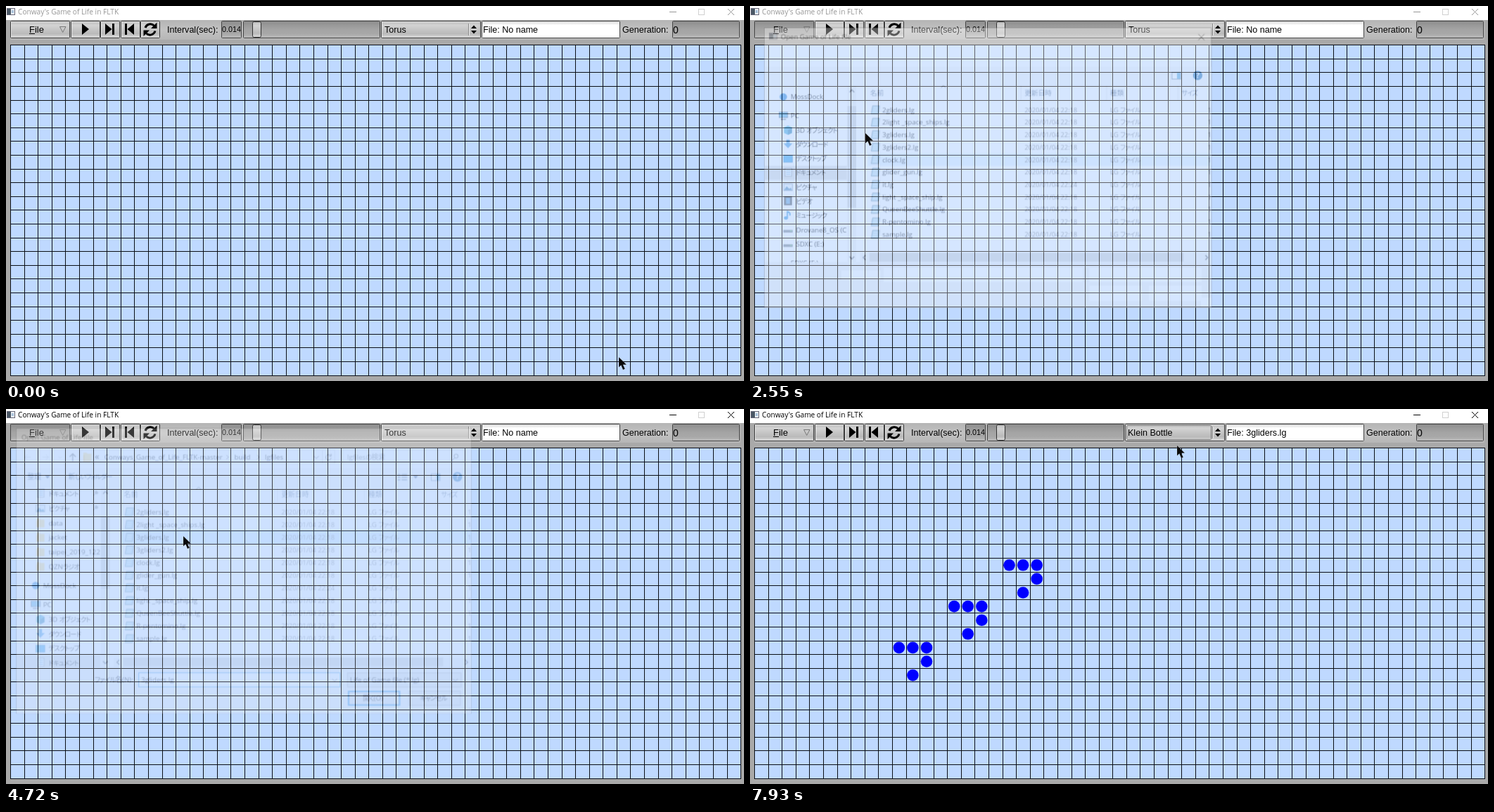
An HTML page that plays this animation: 1049 by 534 pixels, repeating every 8 s.

```html
<!DOCTYPE html>
<html lang="ja">
<head>
<meta charset="utf-8">
<title>Game of Life</title>
<style>
html,body{margin:0;width:100%;height:100%;overflow:hidden;background:#a9a9a9}
svg{display:block;width:1049px;height:534px}
text{white-space:pre}
.ui{font:10.15px 'Open Sans','Noto Sans CJK JP','Noto Sans CJK',sans-serif;font-feature-settings:"palt"}
.kana{font-size:9.6px;letter-spacing:-.8px}
.app{font:12.55px 'Liberation Sans',Arial,sans-serif}
.dim{fill:#6d6d6d}
.date{font-size:9.7px}
.line{fill:none;stroke:#444}
#dialog{transform-origin:338px 230px;animation:dialog 8s step-end infinite}
#nav{animation:nav 8s step-end infinite}
#cursor{animation:cursor 8s step-end infinite}
@keyframes dialog{
  0%{opacity:0;transform:scale(.93)}
  31.7%{opacity:.35;transform:scale(.95)}
  32.7%{opacity:.8;transform:scale(.985)}
  33.7%,56%{opacity:1;transform:none}
  57%{opacity:.8;transform:scale(.99)}
  58%{opacity:.5;transform:scale(.98)}
  59%{opacity:.22;transform:scale(.967)}
  59.9%,100%{opacity:0;transform:scale(.95)}
}
@keyframes nav{
  0%{transform:translateY(-128px)}
  36.6%,100%{transform:none}
}
@keyframes cursor{
  0%{transform:translate(871px,500px)}
  .87%{transform:translate(871px,500px);animation-timing-function:steps(9,start)}
  9.6%{transform:translate(84px,41px)}
  10.5%{transform:translate(84px,41px);animation-timing-function:steps(3,start)}
  13.3%{transform:translate(71px,35px)}
  16.37%{transform:translate(71px,35px);animation-timing-function:steps(3,start)}
  19.2%{transform:translate(63px,49px)}
  20.12%{transform:translate(60px,55px)}
  21.12%{transform:translate(56px,49px)}
  24%{transform:translate(45px,44px)}
  26%{transform:translate(45px,44px);animation-timing-function:steps(5,start)}
  30.72%{transform:translate(126px,155px);animation-timing-function:steps(5,start)}
  35.62%{transform:translate(221px,220px)}
  36.6%{transform:translate(221px,220px);animation-timing-function:steps(11,start)}
  47.2%{transform:translate(256px,203px);animation-timing-function:steps(3,start)}
  50.1%{transform:translate(252px,184px)}
  56%{transform:translate(252px,181px)}
  59.87%{transform:translate(252px,181px);animation-timing-function:steps(7,start)}
  66.37%{transform:translate(201px,65px);animation-timing-function:steps(2,start)}
  68.3%{transform:translate(216px,45px);animation-timing-function:steps(4,start)}
  72.1%{transform:translate(385px,39px);animation-timing-function:steps(5,start)}
  77%{transform:translate(573px,50px);animation-timing-function:steps(6,start)}
  82.7%{transform:translate(623px,35px)}
  85.75%{transform:translate(623px,35px);animation-timing-function:steps(5,start)}
  90.6%{transform:translate(600px,41px)}
  93.37%{transform:translate(610px,45px)}
  96.25%{transform:translate(610px,52px)}
  99.12%,100%{transform:translate(607px,52px)}
}
</style>
</head>
<body>
<svg id="stage" viewBox="0 0 1049 534"></svg>
<script>
const LOOP = 8000, MENU = 1140, MENU_END = 2080, READY = 2850, LOADED = 4870, PICK = 6690, PICKED = 7700;
const range = n => [...Array(n).keys()];

const rect = (x, y, w, h, fill, more = '') =>
  `<rect x="${x}" y="${y}" width="${w}" height="${h}" fill="${fill}" ${more}/>`;
const box = (x, y, w, h, fill, stroke, more = '') =>
  rect(x + .5, y + .5, w - 1, h - 1, fill, `stroke="${stroke}" ${more}`);
const text = (x, y, s, more = '') => `<text x="${x}" y="${y}" ${more}>${
  s.replace(/[\u3040-\u30ff]+/g, '<tspan class="kana">$&</tspan>')}</text>`;
const path = (d, more = 'class="line"') => `<path d="${d}" ${more}/>`;
const during = (times, s) => `<g data-on="${times}">${s}</g>`;
const gradient = (id, ...colors) =>
  `<linearGradient id="${id}" x2="0" y2="1">${colors.map((c, i) =>
    `<stop offset="${i / (colors.length - 1)}" stop-color="${c}"/>`).join('')}</linearGradient>`;

const button = (x, w, fill = 'url(#up)') =>
  box(x, 21, w, 25, fill, '#3a3a3a', 'rx="1"') + path(`M${x + 1.5} 44V22.5H${x + w - 2}`, 'fill="none" stroke="#fff" opacity=".55"');
const sunken = (x, w, fill = 'url(#down)') => box(x, 21, w, 25, fill, '#444', 'rx="1"');

function titleBar() {
  return rect(0, 0, 1049, 20, '#fff') + appIcon(1, 3) + `<g id="title" fill="currentColor" class="ui">${
    text(17, 12, "Conway's Game of Life in FLTK")}${
    path('M943 8.5h10M1026 4l9 9m0-9l-9 9', 'stroke="currentColor" fill="none"')}</g>` +
    box(984, 4, 9, 9, 'none', '#d0d0d0');
}

function appIcon(x, y) {
  return box(x, y, 12, 10, '#eef2f6', '#667') + rect(x + 1, y + 1, 5, 8, '#4a5866') + rect(x + 7, y + 3, 3, 4, '#a9c3dc');
}

function toolbar() {
  return rect(6, 20, 1038, 28, 'url(#bar)') +
    button(6, 85) + during(`${MENU} ${LOADED}`, sunken(6, 85)) +
    text(33, 38, 'File', 'font-size="13"') + rect(33, 39, 8, 1, '#000') +
    path('M76.5 29.5h8.5L80.7 37.5z', 'fill="none" stroke="#777"') +
    button(92, 42) + path('M108 25v16l10-8z', '') +
    button(134, 28) + path('M141 25v16l9.5-8zM151 25h3v16h-3z', '') +
    button(163, 28) + path('M182 25v16l-9.5-8zM169 25h3v16h-3z', '') +
    button(191, 28) +
    path('M198 31A7.5 7.5 0 0 1 210.500 28M212 35.500A7.500 7.500 0 0 1 199.500 39', 'fill="none" stroke="#000" stroke-width="3"') +
    path('M214.500 23.500v8.500h-8.500zM195.500 43v-8.500h8.500z', '') +
    text(229, 38, 'Interval(sec):') + sunken(306, 29) + text(307, 37, '0.014', 'font-size="10.8"') +
    sunken(337, 195) + box(350, 22, 13, 23, 'url(#up)', '#333', 'rx="2"') +
    button(533, 142) + rect(657, 25, 1, 17, '#888') + rect(658, 25, 1, 17, '#eee') +
    path('M661 32l4-4.500 4 4.500zM661 35l4 4.500 4-4.500z', '') +
    during(`0 ${PICKED}`, text(538, 38, 'Torus')) +
    during(`${PICKED} ${LOOP}`, text(537, 38, 'Klein Bottle') + box(535, 23, 121, 21, 'none', '#777', 'rx="1"')) +
    sunken(676, 197, 'url(#field)') +
    during(`0 ${LOADED}`, text(678, 38, 'File: No name')) +
    during(`${LOADED} ${LOOP}`, text(678, 38, 'File: 3gliders.lg')) +
    text(876, 38, 'Generation:') + sunken(947, 96) + text(948, 38.500, '0', 'font-size="14"');
}

const CW = 19.585, CH = 19.6;

function board() {
  const cols = range(54).map(i => rect(Math.round(6.1 + i * CW), 55, 1, 472, '#0b0f16')).join('');
  const rows = range(25).map(i => rect(6, Math.round(55.2 + i * CH), 1039, 1, '#0b0f16')).join('');
  const glider = (c, r) => [[0, 0], [1, 0], [2, 0], [2, 1], [1, 2]].map(([x, y]) =>
    `<circle cx="${6.2 + (c + x + .5) * CW}" cy="${55.7 + (r + y + .5) * CH}" r="8.300" fill="#00f"/>`).join('');
  return rect(6, 55, 1038, 471, '#bfd9ff') + cols + rows +
    during(`${LOADED} ${LOOP}`, glider(18, 8) + glider(14, 11) + glider(10, 14));
}

// Each item may carry the time span in which it is lit.
function menu(x, y, w, items) {
  return box(x, y, w, items.length * 18 + 2, '#c8c8c8', '#444') + items.map(([name, lit], i) => {
    const top = y + 1 + i * 18;
    return text(x + 5, top + 13.500, name) + (lit ? during(lit,
      rect(x + 2, top, w - 4, 18, '#0078d7') + text(x + 5, top + 13.500, name, 'fill="#fff"')) : '');
  }).join('');
}

const icons = {
  folder: x => path(`M${x - 6}-6.500h5l1 1.500h6v11.500h-12z`, 'fill="#ffd977"') + rect(x - 6, -3, 2, 9, '#f3bf4c'),
  doc: x => box(x - 5, -7, 11, 13, '#fff', '#8a97a3') + path(`M${x - 3}-3.500h7m-7 3h7m-7 3h7`, 'stroke="#5b9bd0"'),
  picture: x => box(x - 7, -5, 14, 11, '#e9f3fa', '#8797a5') + path(`M${x - 6} 5l4-6 4 4 2-2 2 4z`, 'fill="#3f7fae"'),
  dot: x => `<circle cx="${x}" r="5.500" fill="#0a74d0"/>`,
  pc: x => box(x - 7, -6, 14, 9, '#4aa9e0', '#567') + rect(x - 4, 4.500, 8, 1.500, '#567'),
  cube: x => path(`M${x}-7l6 3v8l-6 3-6-3v-8z`, 'fill="#35a5d8"') + path(`M${x} 0l6-4v8l-6 3z`, 'fill="#1673a5"'),
  down: x => path(`M${x - 2.5}-7h5v6h4l-6.500 7-6.500-7h4z`, 'fill="#2c8fe0"'),
  desk: x => box(x - 7, -5, 14, 11, '#1b97ea', '#1676bd'),
  video: x => rect(x - 6, -7, 12, 13, '#35393d') + rect(x - 3, -5, 6, 9, '#5a9bd2'),
  music: x => path(`M${x - 1}-7v10M${x - .5}-6q5 2 3 6`, 'fill="none" stroke="#1b87d6" stroke-width="2"') +
    `<ellipse cx="${x - 3}" cy="3.500" rx="3" ry="2.500" fill="#1b87d6"/>`,
  drive: x => rect(x - 7, 0, 14, 4, '#6d7479') + rect(x + 3, 1, 3, 1, '#6ee07a')
};

const places = [
  [1, 116.5, 'doc', 'ドキュメント', 1], [1, 138, 'picture', 'ピクチャ', 1], [1, 160, 'folder', 'data'],
  [1, 181, 'folder', 'jacket'], [1, 202.5, 'folder', 'taipei_2019_1226'], [1, 224, 'folder', 'QZNラジオ'],
  [0, 252, 'dot', 'MossDock'], [0, 280.5, 'pc', 'PC'], [1, 302, 'cube', '3D オブジェクト'],
  [1, 323, 'down', 'ダウンロード'], [1, 344.5, 'desk', 'デスクトップ'], [1, 365.5, 'doc', 'ドキュメント'],
  [1, 387, 'picture', 'ピクチャ'], [1, 408.5, 'video', 'ビデオ'], [1, 430, 'music', 'ミュージック'],
  [1, 451.5, 'drive', 'Drovane8_OS (C:)'], [1, 473, 'drive', 'SDXC (E:)'], [0, 501, 'drive', 'SDXC (F:)']
];

const files = ['2gliders.lg', '2light _space_ships.lg', '3gliders.lg', '3gliders2.lg', 'clock.lg', 'glider_gun.lg',
  'it.lg', 'light _space_ship.lg', 'QueenBeeShuttle.lg', 'R-pentomino.lg', 'sample.lg'];
const ROW = 18.67;

function navPane() {
  const list = places.map(([deep, y, icon, name, pin]) =>
    `<g transform="translate(0 ${y})">${icons[icon](deep ? 39 : 32)}${text(deep ? 51 : 43, 3.7, name)}${
      pin ? path('M117 3l3-3m-1-3l4 4m-2-5l3 3-3 2-2-2z', 'fill="#888" stroke="#888"') : ''}</g>`).join('');
  const bar = (y, h) => rect(128, y, 13, h, '#cdcdcd');
  return `<g clip-path="url(#pane)"><g id="nav">${rect(4, 355.5, 123, 21, '#d9d9d9')}${list}</g></g>` +
    rect(128, 107, 13, 265, '#f0f0f0') + during('0 2930', bar(138, 152)) + during(`2930 ${LOOP}`, bar(151, 106)) +
    path('M131 117l3.500-3.500 3.500 3.500M131 363.500l3.500 3.500 3.500-3.500', 'fill="none" stroke="#444" stroke-width="1.500"');
}

function fileList() {
  const heads = [[162, '名前'], [393, '更新日時'], [521, '種類'], [628, 'サイズ']];
  return heads.map(([x, s]) => text(x, 121.500, s, 'fill="#4c607a"')).join('') +
    [387, 515, 622].map(x => rect(x, 107, 1, 22, '#e2e2e2')).join('') + path('M268 110.500l3.500-3.500 3.500 3.500') +
    `<g id="hover">${rect(159, 134, 513, ROW, '#e5f3ff')}${
      during(`4310 ${LOOP}`, rect(159.5, 134.5, 512, ROW - 1, '#cce8ff', 'stroke="#99d1ff"'))}</g>` +
    files.map((name, i) => {
      const y = 143.5 + i * ROW;
      return path(`M165.500 ${y - 6}h10.500l-1.500 12h-11z`, 'fill="#a9d3e6" stroke="#6d8d9d"') +
        path(`M167 ${y - 3}h6m-6.500 3h6m-6.500 3h6`, 'stroke="#e9f7fc"') +
        text(180, y + 3.7, name, 'fill="#111"') +
        text(393, y + 3.7, `2020/01/04 22:${i == 6 ? 24 : 18}`, 'class="dim date"') +
        text(521, y + 3.7, 'LG ファイル', 'class="dim"') + text(667, y + 3.7, '1', 'class="dim"');
    }).join('') +
    rect(147, 358, 525, 14, '#f0f0f0') + rect(161, 358, 470, 13, '#cdcdcd') +
    path('M155 361.500l-3.500 3.500 3.500 3.500M663.500 361.500l3.500 3.500-3.500 3.500', 'fill="none" stroke="#444" stroke-width="1.500"');
}

function addressBar() {
  return path('M25 63H16m4-4l-4 4 4 4M42 63h9m-4-4l4 4-4 4M65.500 62l2.500 2.500 2.500-2.500', 'fill="none" stroke="#ccc"') +
    path('M86.500 69V58m-4.500 4.500l4.500-4.500 4.500 4.500', 'fill="none" stroke="#555" stroke-width="1.500"') +
    box(98, 52, 374, 21, '#fff', '#d9d9d9') + `<g transform="translate(0 63)">${icons.folder(108)}</g>` +
    text(119, 66, '«', 'font-size="13"') + text(133, 66.500, 'Conways_Game_of_Life_FLTK-master') +
    path('M312.500 60l3 3-3 3M357.500 60l3 3-3 3M441 61.500l3.500 3.500 3.500-3.500') +
    text(324, 66.500, 'build') + text(369, 66.500, 'lgfiles') + rect(453, 53, 1, 19, '#d9d9d9') +
    path('M465.500 60.500A4 4 0 1 0 466.500 64M466.500 58v3.500h-3.500') +
    box(482, 52, 180, 21, '#fff', '#d9d9d9') + text(490, 66.500, 'lgfilesの検索', 'class="dim"') +
    `<circle cx="650" cy="61.500" r="3" class="line"/>` + path('M648 64l-4 4');
}

function bottomBlank() {
  return [[119, 384, 59, 14], [182, 380, 298, 22], [490, 380, 168, 22], [490, 407, 79, 23], [579, 407, 79, 23], [657, 425, 15, 14]]
    .map(r => rect(...r, '#fff')).join('');
}

function bottomFull() {
  return text(119, 394.500, 'ファイル名(N):') + box(183, 380, 297, 22, '#fff', '#0078d7') +
    during(`${READY} 3380 3910 4310`, rect(186, 384, 1.5, 15, '#000')) +
    during(`4310 ${LOOP}`, text(187, 394.500, '3gliders.lg')) +
    path('M468 389.500l3.500 3.500 3.500-3.500') +
    box(490, 380, 168, 22, '#e1e1e1', '#adadad') + text(494, 394.500, 'Life of Game file (*.lg)') +
    path('M645.500 389.500l3.500 3.500 3.500-3.500') +
    rect(492, 408, 75, 20, '#e1e1e1', 'stroke="#0078d7" stroke-width="2"') + text(513, 421.500, '開く(O)') +
    box(580, 407, 77, 22, '#e1e1e1', '#adadad') + text(597, 421.500, 'キャンセル') +
    [[669, 432], [669, 436], [665, 436]].map(([x, y]) => rect(x, y, 2, 2, '#bbb')).join('');
}

function dialog() {
  return `<g id="dialog" class="ui">` + box(3, 20, 670, 421, '#fff', '#777') +
    during('0 4560', appIcon(11, 28) + text(28, 37.500, 'Open Game of Life file') +
      path('M653 30l9 9m0-9l-9 9', 'stroke="#111"')) +
    during(`4560 ${LOOP}`, text(11, 37.500, 'Open Game of Life file')) +
    rect(4, 79, 668, 27, '#f5f6f7') + rect(4, 106, 668, 1, '#e8e9ea') +
    box(613, 87, 14, 11, '#fff', '#667d90') + rect(621, 88, 5, 9, '#4aa3d8') +
    `<circle cx="652" cy="92" r="7" fill="#0b5fa5"/>` + text(649.500, 96, '?', 'fill="#fff" font-weight="700" font-size="11"') +
    navPane() + fileList() + rect(4, 372, 668, 68, '#f0f0f0') +
    during(`0 ${READY}`, bottomBlank()) + during(`${READY} ${LOOP}`, addressBar() + bottomFull()) +
    during(`2930 ${LOOP}`, text(20, 95.500, '整理', 'fill="#1e395b"') + text(80, 95.500, '新しいフォルダー', 'fill="#1e395b"') +
      path('M46 90.500h7l-3.500 4zM587 90.500h7l-3.500 4z', 'fill="#1e395b"') +
      path('M564 88.500h4m2 0h8M564 92.500h4m2 0h8M564 96.500h4m2 0h8', 'stroke="#7b8a98" stroke-width="2"')) +
    '</g>';
}

const stage = document.getElementById('stage');
stage.innerHTML = '<defs>' +
  gradient('up', '#bdbdbd', '#d2d2d2', '#c6c6c6', '#bababa', '#dedede') +
  gradient('down', '#8c8c8c', '#999', '#a4a4a4', '#a8a8a8', '#bcbcbc') +
  gradient('field', '#d6d6d6', '#fff', '#fff', '#fff', '#fff') + gradient('bar', '#b4b4b4', '#c2c2c2', '#b6b6b6') +
  `<clipPath id="pane">${rect(4, 107, 123, 265, '#000')}</clipPath></defs>` +
  rect(0, 0, 1049, 534, '#a9a9a9') + titleBar() + `<g class="app">${toolbar()}</g>` + board() +
  `<g class="app">${
    during(`${MENU} ${MENU_END}`, menu(6, 47, 90, [['Open', `1460 ${MENU_END}`], ['Save'], ['Quit']]))}${
    during(`${PICK} ${PICKED}`, menu(533, 22, 142, [['Torus', `${PICK} 7170`], ['Klein Bottle', `7170 ${PICKED}`],
      ['Cylinder'], ['Mobius Strip'], ['Plane']]))}</g>` +
  dialog() + `<g id="cursor">${path('M0 0V14.500L3.300 11.500 6 18l2.800-1.200L6 10.800H11z', 'fill="#0a0a0a" stroke="#fff" stroke-opacity=".25" stroke-width=".5"')}</g>`;

let count = 0, css = '';
function step(el, prop, frames) {
  const name = 'step' + count++;
  css += `@keyframes ${name}{${frames.map(([t, v]) => `${t / LOOP * 100}%{${prop}:${v}}`).join('')}}`;
  el.style.animation = `${name} ${LOOP}ms step-end infinite`;
}

document.querySelectorAll('[data-on]').forEach(el => {
  const times = el.dataset.on.split(' ').map(Number);
  step(el, 'opacity', [[0, 0], ...times.map((t, i) => [t, 1 - i % 2])]);
});
step(document.getElementById('title'), 'color',
  [[0, '#969696'], [MENU, '#000'], [MENU_END, '#969696'], [4480, '#000'], [LOOP, '#000']]);
step(document.getElementById('hover'), 'transform',
  [[0, 4], [3480, 3], [3855, 2], [LOOP, 2]].map(([t, i]) => [t, `translateY(${i * ROW}px)`]));
document.head.appendChild(document.createElement('style')).textContent = css;
</script>
</body>
</html>
```
